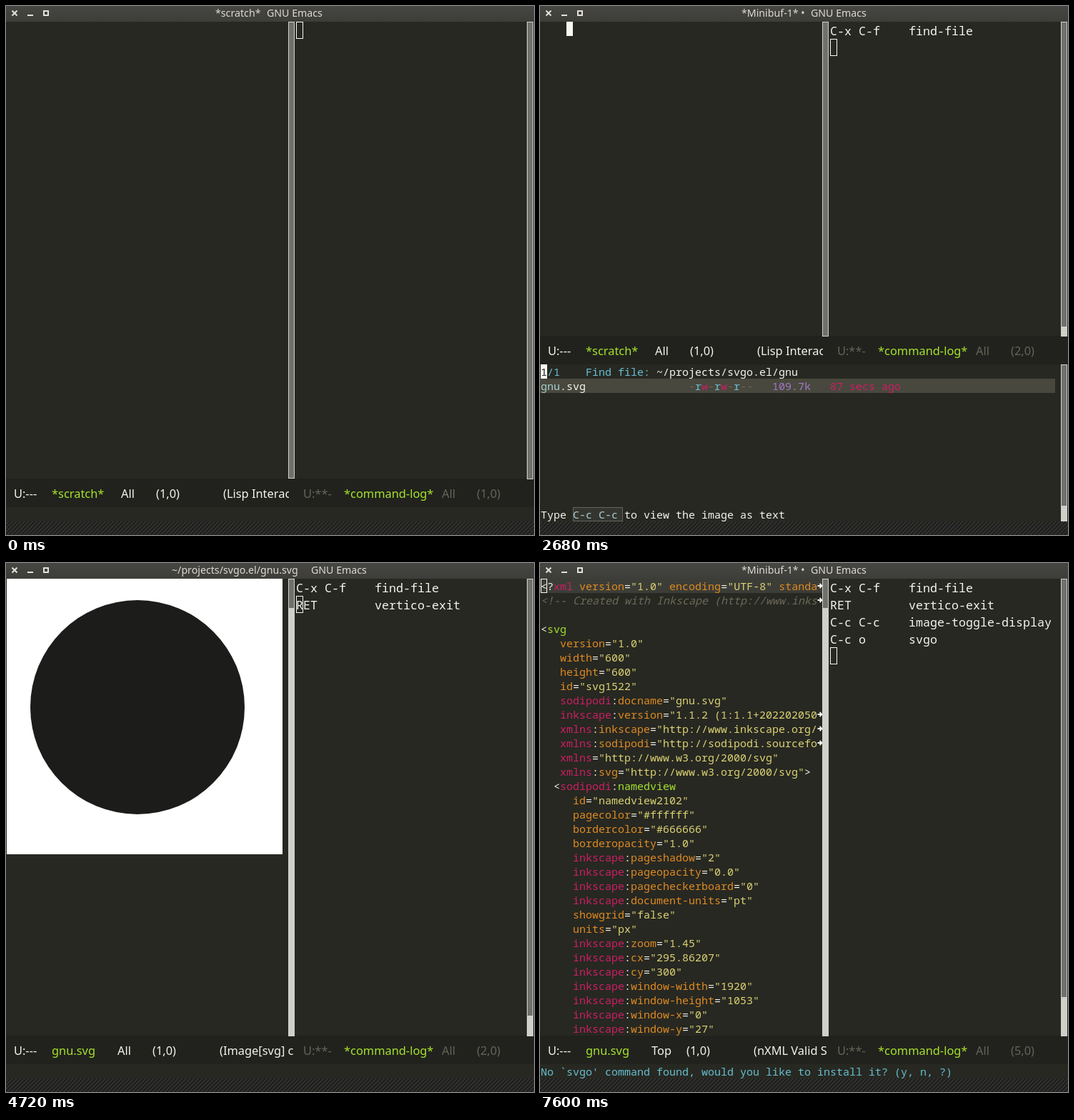
An HTML page for the animation above (8000 ms loop, 739 by 741 pixels).

```html
<!DOCTYPE html>
<html lang="en">
<head>
<meta charset="utf-8">
<title>Emacs session</title>
<style>
html, body { margin: 0; width: 100%; height: 100%; overflow: hidden; background: #272822; }
svg { display: block; }
#stage { width: 739px; height: 741px; }
text { white-space: pre; fill: #f4f4ec; }
.mono { font: 300 15px "Noto Sans Mono", monospace; }
.log { font: 300 16.667px "Noto Sans Mono", monospace; }
.mode { font: 16.4px "Noto Sans", sans-serif; }
.title { font: 500 14.2px "Noto Sans", sans-serif; fill: #dfdbd2; }
.pink { fill: #cb1f64; }
.orange { fill: #df8a22; }
.yellow { fill: #dcd273; }
.green { fill: #a6e22e; }
.cyan { fill: #66bfd0; }
.pale { fill: #a5cfd2; }
.purple { fill: #a079c8; }
.grey { fill: #6c6958; }
.dim { fill: #64645a; }
.dark { fill: #272822; }
.note { fill: #6c6958; font-style: italic; }
</style>
</head>
<body>
<svg id="stage" viewBox="0 0 739 741">
  <defs>
    <linearGradient id="bar" x2="0" y2="1">
      <stop stop-color="#464642"/><stop offset="1" stop-color="#3d3d3a"/>
    </linearGradient>
    <pattern id="hatch" width="4" height="4" patternUnits="userSpaceOnUse" patternTransform="rotate(45)">
      <rect width="4" height="4" fill="#1d1d1c"/><rect width="2" height="4" fill="#31312f"/>
    </pattern>
  </defs>
</svg>
<script>
const LOOP = 8000, END = LOOP;
const stage = document.getElementById('stage');
const parts = [];

const esc = s => s.replace(/&/g, '&amp;').replace(/</g, '&lt;').replace(/>/g, '&gt;');
const span = (cls, s) => `<tspan class="${cls}">${esc(s)}</tspan>`;
const text = (cls, x, y, body) => `<text class="${cls}" x="${x}" y="${y}">${body}</text>`;
const rect = (x, y, w, h, fill, extra = '') =>
  `<rect x="${x}" y="${y}" width="${w}" height="${h}" fill="${fill}" ${extra}/>`;
const frame = (x, y, w, h, stroke = '#f8f8f0', fill = 'none') =>
  rect(x + .5, y + .5, w - 1, h - 1, fill, `stroke="${stroke}"`);
const row = (x, y, body) => text('mono', x, y + 16, body);
const block = (x, y, ch = '') => rect(x, y, 9, 20, '#f8f8f0') + (ch && row(x, y, span('dark', ch)));

// Show markup from time a until time b
function show(a, b, markup) {
  const g = document.createElementNS('http://www.w3.org/2000/svg', 'g');
  g.innerHTML = markup;
  stage.append(g);
  parts.push({ g, a, b });
}

const scrollbar = (x, y0, y1, thumbEnd) =>
  rect(x, y0, 9, y1 - y0, '#d0d0cb') + rect(x + 1, y0 + 1, 7, thumbEnd - y0 - 1, '#70706c');

function modeLine(y, buf, line, clip = 404) {
  const gnu = buf.name !== '*scratch*', shift = gnu ? 5 : 0, base = 27;
  return rect(0, y, 739, 40, '#21221d') +
    `<svg x="0" y="${y}" width="${clip}" height="40">` +
    text('mode', 11, base, 'U:---') +
    text('mode green', 64, base, buf.name) +
    text('mode', 161 - shift, base, buf.pos) +
    text('mode', 210 - shift, base, '(1,0)') +
    text('mode', 304 - shift, base, buf.mode) + '</svg>' +
    text('mode dim', 416, y + base, 'U:**-') +
    text('mode green', 473, y + base, '*command-log*') +
    text('mode dim', 610, y + base, 'All') +
    text('mode dim', 659, y + base, `(${line},0)`);
}

const title = (x, name, ex) => text('title', x, 15, name) + text('title', ex, 15, 'GNU Emacs');
const logLine = (i, key, cmd) =>
  text('log', 406, 41 + 24 * i, key) + text('log', 516, 41 + 24 * i, cmd);
const logCursor = i => frame(406, 22 + 24 * i, 10, 24);

const scratch = { name: '*scratch*', pos: 'All', mode: '(Lisp Interac' };
const image = { name: 'gnu.svg', pos: 'All', mode: '(Image[svg] c' };
const xmlStart = { name: 'gnu.svg', pos: 'Top', mode: '(nXML Validat' };
const xmlDone = { name: 'gnu.svg', pos: 'Top', mode: '(nXML Valid S' };

// Window chrome
show(0, END,
  rect(0, 0, 739, 741, '#272822') + rect(0, 0, 739, 22, 'url(#bar)') +
  rect(0, 722, 739, 19, 'url(#hatch)') +
  '<g fill="none" stroke="#e4e1d9" stroke-width="2"><path d="M8.5 6.5l7 7m0-7l-7 7M30 13h8"/>' +
  '<rect x="53" y="7" width="6" height="6"/></g>');

const miniTitle = title(282, '*Minibuf-1* •', 379);
const fileTitle = title(232, '~/projects/svgo.el/gnu.svg', 427);
show(0, 880, title(293, '*scratch*', 365));
show(880, 3680, miniTitle);
show(3680, 3720, title(293, '*scratch*', 365));
show(3720, 6040, fileTitle);
show(6040, END, miniTitle);

// Mode lines
show(0, 880, modeLine(662, scratch, 1, 396));
show(880, 3720, modeLine(462, scratch, 2, 396));
show(3720, 4720, modeLine(622, image, 2));
show(4720, 4960, modeLine(662, image, 2));
show(4960, 5040, modeLine(662, xmlStart, 4));
show(5040, 6040, modeLine(662, xmlDone, 4));
show(6040, END, modeLine(662, xmlDone, 5));

// Command log
show(880, END, logLine(0, 'C-x C-f', 'find-file'));
show(3720, END, logLine(1, 'RET', 'vertico-exit'));
show(4960, END, logLine(2, 'C-c C-c', 'image-toggle-display'));
show(6040, END, logLine(3, 'C-c o', 'svgo'));
show(0, 880, logCursor(0));
show(880, 4960, logCursor(1));
show(4960, 6040, logCursor(3));
show(6040, END, logCursor(4));

// Scratch buffer cursor
show(520, 880, block(37, 22));
show(880, 2680, frame(37, 22, 9, 20));
show(2680, 3720, block(37, 22));

// Find file prompt
const typed = [[880, 1760, ''], [1760, 1800, 'g'], [1800, 1960, 'gn'], [1960, 3720, 'gnu']];
const perms = [...'-rw-rw-r--'].map(c => span({ r: 'cyan', w: 'pink' }[c] || 'grey', c)).join('');
show(1000, 3720, rect(0, 522, 721, 20, '#49483e') + row(208, 522, perms) +
  row(325, 522, span('purple', '109.7k')) + row(406, 522, span('pink', '87 secs ago')));
for (const [a, b, s] of typed) {
  show(a, b, row(1, 502, span('cyan', '1/1    Find file: ') + '~/projects/svgo.el/' + s));
  show(Math.max(a, 1000), b,
    row(1, 522, span(s.length > 1 ? 'pale' : 'cyan', s) + 'gnu.svg'.slice(s.length)));
}
show(880, 1400, block(334, 502));
show(1760, 1800, block(343, 502));
show(1800, 1960, block(352, 502));
show(1960, 2440, block(361, 502));
show(2680, 3720, block(1, 502, '1'));

// Echo area
show(2680, 4720, frame(46, 702, 70, 20, '#63645c', '#34352f') +
  row(1, 702, 'Type ' + span('pale', 'C-c C-c') + ' to view the image as text'));
show(4960, 5920, row(1, 702, 'Using vacuous schema'));
show(6040, END, row(1, 702,
  span('cyan', "No `svgo' command found, would you like to install it? (y, n, ?) ")));
show(6120, 6600, block(586, 702));
show(7120, 7600, block(586, 702));

// Image buffer
show(3720, 4960, rect(1, 22, 386, 386, '#fff') + '<circle cx="184" cy="202" r="150" fill="#1c1c1b"/>');

// XML buffer
const xml = `<?xml version="1.0" encoding="UTF-8" standa
<!-- Created with Inkscape (http://www.inks

<svg
   version="1.0"
   width="600"
   height="600"
   id="svg1522"
   sodipodi:docname="gnu.svg"
   inkscape:version="1.1.2 (1:1.1+202202050
   xmlns:inkscape="http://www.inkscape.org/
   xmlns:sodipodi="http://sodipodi.sourcefo
   xmlns="http://www.w3.org/2000/svg"
   xmlns:svg="http://www.w3.org/2000/svg">
  <sodipodi:namedview
     id="namedview2102"
     pagecolor="#ffffff"
     bordercolor="#666666"
     borderopacity="1.0"
     inkscape:pageshadow="2"
     inkscape:pageopacity="0.0"
     inkscape:pagecheckerboard="0"
     inkscape:document-units="pt"
     showgrid="false"
     units="px"
     inkscape:zoom="1.45"
     inkscape:cx="295.86207"
     inkscape:cy="300"
     inkscape:window-width="1920"
     inkscape:window-height="1053"
     inkscape:window-x="0"
     inkscape:window-y="27"`.split('\n');

function highlight(line) {
  if (line.startsWith('<!')) return span('note', line);
  const tag = /^\s*<\w/.test(line);
  return line.replace(/"[^"]*"?|[\w-]+|[^\w"]+/g, (s, at) => {
    if (s[0] === '"') return span('yellow', s);
    if (!/\w/.test(s)) return esc(s);
    if (s === 'xmlns' || s === 'xml' || line[at + s.length] === ':') return span('pink', s);
    return span(tag ? 'green' : 'orange', s);
  });
}

const listing = paint => xml.map((l, i) => row(1, 22 + 20 * i, paint(l))).join('');
const arrows = xml.map((l, i) => l.length < 43 ? '' :
  `<path d="M388.5 ${32 + 20 * i}h6m-3-3l3 3l-3 3" fill="none" stroke="#f8f8f0" stroke-width="1.8"/>`).join('');
show(5040, END, rect(0, 22, 395, 20, '#3c3d37'));
show(4960, 5040, listing(esc));
show(5040, END, listing(highlight));
show(4960, END, arrows);
show(4960, 5520, block(1, 22, '<'));
show(6040, END, frame(1, 22, 9, 20));

// Scroll bars
const bars = [
  [0, 880, 395, 22, 662, 661], [880, 3680, 395, 22, 463, 462],
  [3680, 3720, 395, 22, 623, 622], [3720, 4720, 395, 22, 623, 63], [4720, END, 395, 22, 663, 63],
  [0, 880, 729, 22, 663, 662], [880, 3720, 729, 22, 463, 449], [3720, 4720, 729, 22, 623, 594],
  [4720, 4960, 729, 22, 663, 634], [4960, 6040, 729, 22, 663, 617], [6040, END, 729, 22, 663, 608],
  [880, 1960, 729, 502, 722, 702], [1960, 3720, 729, 502, 722, 700]
];
for (const [a, b, ...box] of bars) show(a, b, scrollbar(...box));

const start = performance.now();
function tick() {
  const t = (performance.now() - start) % LOOP;
  for (const { g, a, b } of parts) g.style.display = t >= a && t < b ? '' : 'none';
  requestAnimationFrame(tick);
}
tick();
</script>
</body>
</html>
```
